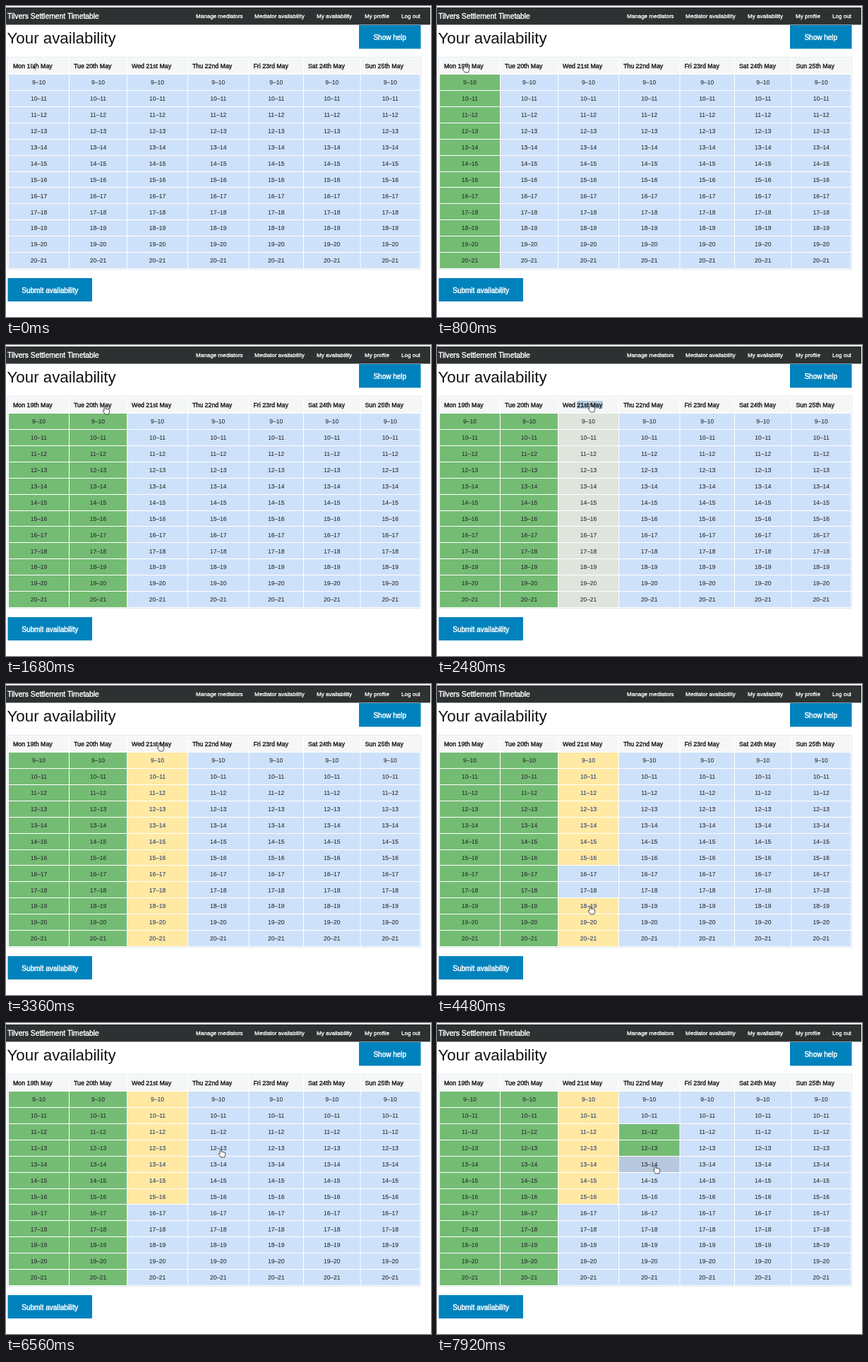
These frames come from a looping animation (602 px wide and 440 px high, 8 s). An HTML page with a canvas:

```html
<!DOCTYPE html>
<html lang="en">
<head>
<meta charset="utf-8">
<title>Your availability</title>
<style>
html, body { margin: 0; width: 602px; height: 440px; overflow: hidden; background: #fff; }
canvas { display: block; }
</style>
</head>
<body>
<canvas id="stage" width="602" height="440"></canvas>
<script>
const g = document.getElementById('stage').getContext('2d');
const LOOP = 8000, FADE = 200, PRESS = 100, SETTLE = 120;
const TOP = 97, PITCH = 22.92;
// Each click moves a cell on to the next colour: unset, free, maybe
const COLORS = [[206, 225, 251], [116, 188, 116], [255, 233, 163]];
const edges = [3.5, 89.5, 171.5, 257.5, 344, 421.5, 502, 586.5];
const days = ['Mon 19th', 'Tue 20th', 'Wed 21st', 'Thu 22nd', 'Fri 23rd', 'Sat 24th', 'Sun 25th'];
const nav = { 'Manage mediators': 269, 'Mediator availability': 352, 'My availability': 440, 'My profile': 508, 'Log out': 560 };

// Pointer stops; the cell or day heading under a clicking stop reacts
const stops = [];
function stop(t, x, y, click = true) {
  const col = edges.findIndex(e => e > x) - 1;
  const row = Math.floor((y - TOP) / PITCH);
  stops.push({ t, x, y, col, row, click });
}
stop(600, 38, 82);
stop(1480, 139, 86);
for (let i = 0; i < 5; i++) stop(1910 + 225 * i, 216, 83);
for (let i = 0; i < 5; i++) stop(3720 + 440 * i, 216, 268 + PITCH * i);
stop(6200, 303, 178, false);
for (let i = 0; i < 3; i++) stop(6960 + 520 * i, 303 + 2.5 * i, 155 + 23 * i);

const clamp = v => Math.max(0, Math.min(1, v));
const ease = v => v * v * (3 - 2 * v);
const lerp = (a, b, k) => a + (b - a) * k;
const mix = (a, b, k) => a.map((v, i) => lerp(v, b[i], k));

function box(x, y, w, h, fill) {
  g.fillStyle = fill;
  g.fillRect(x, y, w, h);
}

function text(s, x, y, size, color, weight = 0, align = 'left') {
  g.font = `${size}px "Liberation Sans", Arial, sans-serif`;
  g.textAlign = align;
  g.fillStyle = g.strokeStyle = color;
  g.fillText(s, x, y);
  if (weight) {
    g.lineWidth = weight;
    g.strokeText(s, x, y);
  }
}

function button(label, x, y, w, h) {
  box(x, y, w, h, '#0082bd');
  text(label, x + w / 2, y + h / 2 + 4, 10, '#fff', .45, 'center');
}

function cellColor(t, col, row) {
  const hits = stops.filter(s => s.click && s.col === col && (s.row < 0 || s.row === row));
  const past = hits.filter(s => s.t <= t);
  const color = past.reduce((c, s, i) => {
    const end = i + 1 < past.length ? past[i + 1].t : t;
    return mix(c, COLORS[(i + 1) % 3], ease(clamp((end - s.t) / FADE)));
  }, COLORS[0]);
  const pressed = hits.some(s => s.t > t && s.t - t < PRESS);
  return pressed ? mix(color, [0, 0, 0], .11) : color;
}

function drawPage() {
  box(0, 0, 602, 440, '#fff');
  box(0, 2, 601, 24.5, '#2d3132');
  text('Tilvers Settlement Timetable', 2, 18, 10.3, '#fff', .4);
  for (const label in nav) text(label, nav[label], 17.3, 8.05, '#fff', .3);
  text('Your availability', 1.5, 53, 22.3, '#111');
  button('Show help', 500, 27, 87.5, 33.5);
  button('Submit availability', 2.5, 385, 119.5, 33);
}

function drawTable(t) {
  box(2, 72, 586, 301, '#dce8ee');
  box(3, 73, 584, 299, '#fff');
  days.forEach((day, col) => {
    const x = edges[col], w = edges[col + 1] - x;
    box(x + .5, 74, w - 1, 22, '#f5f7f6');
    if (col === 2 && t > 2135 && t < 3200) box(198, 79, 37, 11, '#b3cbdf');
    text(day + ' May', x + 6.5, 87.7, 8.8, '#111', .35);
    for (let row = 0; row < 12; row++) {
      const y = Math.round(TOP + row * PITCH), bottom = Math.round(TOP + (row + 1) * PITCH) - 1;
      const color = cellColor(t, col, row);
      box(x + .5, y, w - 1, bottom - y, `rgb(${color.map(Math.round)})`);
      const ink = color[0] > 240 ? '#2c3b72' : '#2b3030';
      text(`${row + 9}–${row + 10}`, x + w / 2, TOP + row * PITCH + 14.2, 8.5, ink, .1, 'center');
    }
  });
}

function drawPointer(t) {
  const next = Math.max(0, stops.findIndex(s => s.t > t));
  const b = stops[next], a = stops[next - 1] || b;
  const travel = Math.max(1, (b.t - a.t) / 4);
  const k = ease(clamp((t - (b.t - SETTLE - travel)) / travel));
  const arrow = t < 80;
  const p = new Path2D(arrow
    ? 'M0 0V8L2 6.3L3.3 9.2L4.6 8.6L3.4 5.8H6Z'
    : 'M0 1Q1-.5 2 1V4.5Q3 3.5 4 4.7Q5 4 5.8 5Q7.4 4.6 7.6 6V8.5L6.5 12H1.5L-1.7 7.6Q-1.7 6 0 7Z');
  g.save();
  g.translate(lerp(a.x, b.x, k), lerp(a.y, b.y, k));
  g.lineJoin = 'round';
  g.lineWidth = .8;
  g.fillStyle = arrow ? '#222' : '#fff';
  g.strokeStyle = arrow ? '#fff' : '#222';
  g.fill(p);
  g.stroke(p);
  g.restore();
}

function frame(now) {
  const t = now % LOOP;
  drawPage();
  drawTable(t);
  drawPointer(t);
  requestAnimationFrame(frame);
}
requestAnimationFrame(frame);
</script>
</body>
</html>
```
